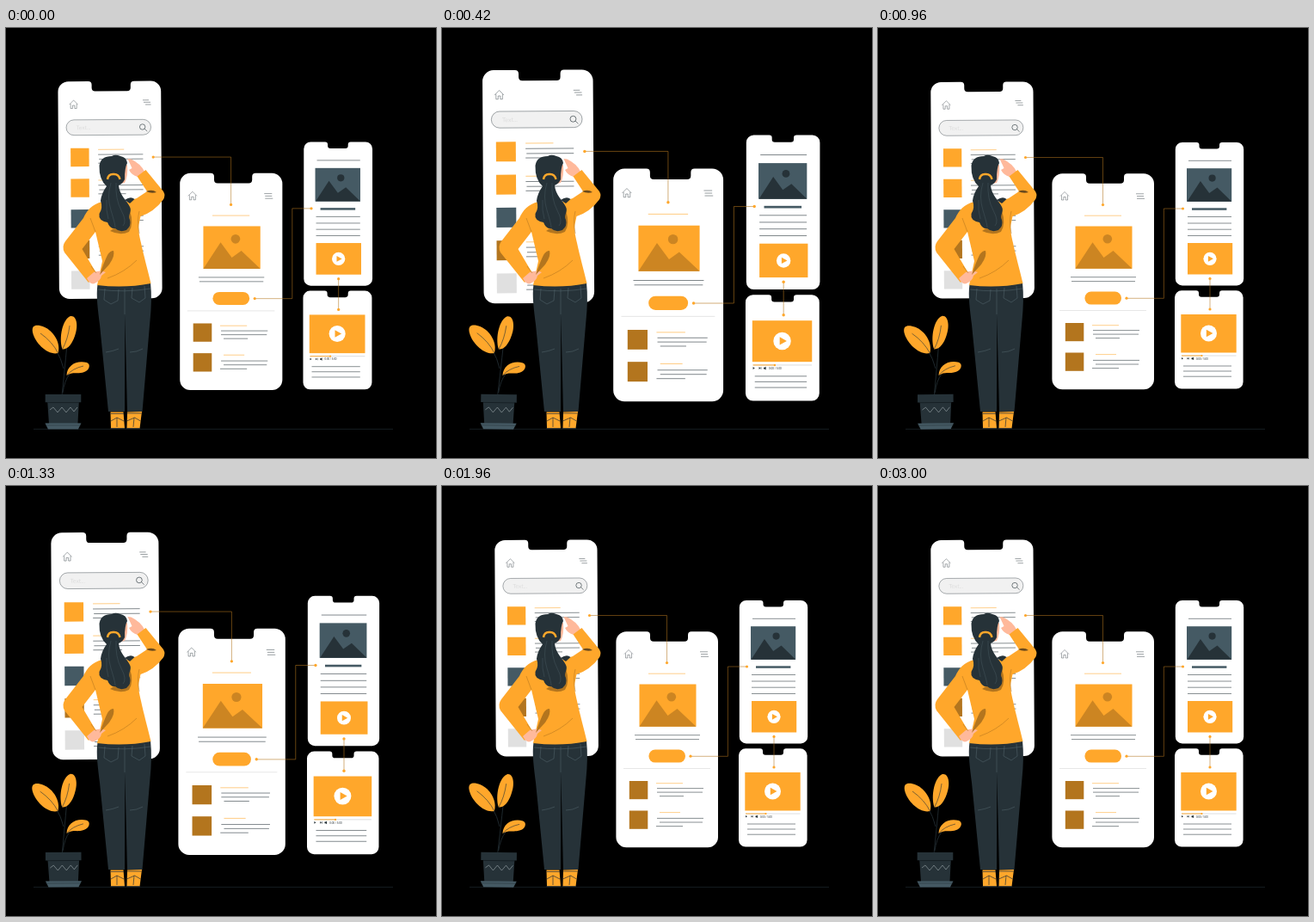
An HTML page for the animation above (3.04 s loop, 500 px wide and 500 px high).

```html
<!DOCTYPE html>
<html lang="en">
<head>
<meta charset="utf-8">
<title>Mobile wireframes</title>
<style>
html, body { margin: 0; width: 100%; height: 100%; overflow: hidden; background: #000; }
svg { display: block; width: 100vw; height: 100vh; }
text { font-family: Lato, sans-serif; }
</style>
</head>
<body>
<svg id="stage" viewBox="0 0 500 500"></svg>
<script>
const ORANGE = '#ffa72b', BROWN = '#b3751e', SHADE = '#cc8522', DARK = '#263238', SLATE = '#455a64', SKIN = '#ffb99b';

const path = (d, fill) => `<path d="${d}" fill="${fill}"/>`;
const line = (d, color = DARK, w = .55) => `<path d="${d}" fill="none" stroke="${color}" stroke-width="${w}"/>`;
const rule = (x1, x2, y, color, w) => line(`M${x1} ${y}H${x2}`, color, w);
const rules = (list, color, w) => list.map(r => rule(...r, color, w)).join('');
const rect = (x, y, w, h, fill, r = 0, more = '') =>
  `<rect x="${x}" y="${y}" width="${w}" height="${h}" rx="${r}" fill="${fill}" ${more}/>`;
const circle = (x, y, r, fill) => `<circle cx="${x}" cy="${y}" r="${r}" fill="${fill}"/>`;
const dot = (x, y) => circle(x, y, 1.6, ORANGE);

// Phone body with a notch between n1 and n2, d deep, with corners e
function phone(x, y, w, h, r, n1, n2, d, e) {
  const v = d - 2 * e, arc = (dx, dy) => `a${r} ${r} 0 0 1 ${dx} ${dy}`;
  return path(`M${x + r} ${y}H${n1}q${e} 0 ${e} ${e}v${v}q0 ${e} ${e} ${e}H${n2 - 2 * e}
    q${e} 0 ${e} ${-e}v${-v}q0 ${-e} ${e} ${-e}H${x + w - r}${arc(r, r)}V${y + h - r}
    ${arc(-r, r)}H${x + r}${arc(-r, -r)}V${y + r}${arc(r, -r)}z`, '#fff');
}

const house = (x, y) => line(`M${x - 5} ${y}l5-5 5 5M${x - 3.5} ${y - 1}v5.5h2.3v-3.5h2.4v3.5h2.3v-5.5`, DARK, .4);

const play = (x, y, r) => circle(x, y, r, '#fff') +
  path(`M${x - r * .28} ${y - r * .45}l${r * .8} ${r * .45}l${-r * .8} ${r * .45}z`, ORANGE);

function listPhone() {
  const fills = [ORANGE, ORANGE, SLATE, BROWN, '#e0e0e0'];
  const rows = fills.map((fill, i) => {
    const y = 140 + 35.5 * i;
    return rect(76.2, y, 21.3, 21.3, fill) + rule(108, 138, y + 1.7, ORANGE) +
      rules([[108, 160, y + 7.5], [109, 160, y + 12.8], [108, 140, y + 17.5]]);
  });
  return `<g transform="rotate(-.35 121.5 188.5)">` +
    phone(62, 62.7, 119.2, 251.6, 12, 97, 150, 11.5, 4) + house(80, 89.5) +
    rules([[160, 167, 84.8], [161, 169, 87.3], [163, 169.5, 90]], DARK, .45) +
    rect(71.3, 107.2, 98, 17.8, '#f1f1f1', 8.9, `stroke="${DARK}" stroke-width=".4"`) +
    `<text x="83" y="118.5" font-size="6.5" fill="#dcdcdc">Text...</text>
    <circle cx="159.5" cy="115.8" r="3.2" fill="none" stroke="${DARK}" stroke-width=".6"/>` +
    line('M162 118l3 3') + rows.join('') + '</g>';
}

function detailPhone() {
  return phone(202.4, 169.2, 118.6, 251, 12, 238, 290, 11.5, 4) + house(217, 195.5) +
    rules([[300, 309, 192.8], [301, 309, 195.6], [301, 310, 198.4]], DARK, .45) +
    rule(240, 283, 218.2, ORANGE) +
    rect(229.5, 230.5, 66, 49.2, ORANGE) + circle(266.8, 245.3, 5.3, SHADE) +
    path('M229.5 279.7L249.5 249.3L262.5 267L273.5 259L295.5 279.7z', SHADE) +
    rules([[224, 300, 289.7], [225, 299, 294.6]]) +
    rect(240.4, 306.6, 42.6, 15, ORANGE, 7.5) + rule(211, 312, 328.5, '#d4d4d4') +
    rect(217.8, 343, 21.5, 21.2, BROWN) + rect(217.8, 377.5, 21.5, 21.3, BROWN) +
    rules([[249, 280, 345.7], [253, 277, 379.6]], ORANGE) +
    rules([[250, 304, 351.6], [250, 303, 356.1], [253, 281, 360.6],
           [250, 304, 386.4], [253, 303, 391], [249, 280, 395.6]]);
}

function articlePhone() {
  return phone(345.8, 133, 79.4, 166.4, 8, 370.5, 400, 7.5, 3) +
    rule(361, 411, 154.3) + rect(359, 163.2, 52.2, 38.6, SLATE) + circle(388.6, 174.6, 4.1, DARK) +
    path('M359.5 201.8L374.9 178L385.2 192L394.5 185.5L411.2 201.8z', DARK) +
    rect(365, 209.3, 40.4, 2.5, SLATE) +
    rules([219.5, 227, 234.2, 241.5].map(y => [360, 411, y])) +
    rect(360, 250, 52.2, 36.5, ORANGE) + play(386, 268.3, 7.6);
}

function videoPhone() {
  return phone(345, 305.3, 79.6, 114.2, 8, 370, 400, 7.5, 3) +
    rect(352.3, 333, 64.4, 44.5, ORANGE) + play(384.5, 355, 9.5) +
    rule(353, 416.5, 381, '#c4c4c4') + rule(353, 377, 381, ORANGE, .9) + circle(376.5, 381, 1.1, ORANGE) +
    path('M353 383l2 1.3-2 1.300zM359.500 383l1.700 1.300-1.700 1.300zM361.500 383h.5v2.600h-.5zM364.500 383.600h1l1.500-.9v3.400l-1.500-.9h-1z', DARK) +
    `<text x="370" y="385.5" font-size="2.8" fill="${DARK}">0:00 / 5:00</text>` +
    rules([393, 399, 405.2].map(y => [355, 411, y]));
}

const links = line('M171.5 150.5H261.5V205.5M289 314.3H332.4V210H354.5M386 291.4V327', BROWN) +
  [[171.5, 150.5], [261.5, 205.6], [289, 314.2], [354.5, 210], [386, 291.4], [386, 327]].map(p => dot(...p)).join('');

const plant =
  line('M44 358Q61 372 67 396M73 345Q70 380 65 428M90 393Q70 396 66 424', DARK, .8) +
  path('M60.5 378C49 381 34 367 31 354C29 345 36 344.500 44 347.500C55 352 64 366 60.500 378z', ORANGE) +
  path('M65.5 373.5C61 360 66 338 75 335C83 334 84 348 80 358C77 367 72 374 65.500 373.500z', ORANGE) +
  path('M70.5 404C71 392 82 386 94 389C99 391 97 398 91 400C83 403 78 399 70.500 404z', ORANGE) +
  line('M40 355Q54 365 60.500 378M74 346Q72 362 65.500 373.500M90 393Q77 396 70.500 404', DARK, .6) +
  path('M45.7 426H87.3V435.3H84.8L83.5 460H50L48.3 435.3H45.7z', DARK) +
  rule(48.5, 85, 435.6, '#11191d', .7) +
  line('M51 444l4-3 5 6 5-6 5 6 5-6 4 5 4-5', '#a9b4b8') +
  path('M45.5 459.5H87.5L84 466.5H49z', SLATE) + rule(46, 87, 462, DARK, .5);

const legs =
  path('M106.5 298C104.500 312 107 328 109 345L119 446H138L138.300 334L141 446H158.500L167.500 340C169 325 169.500 310 168 296z', DARK) +
  line('M115 303l-1 13 8 5 8-4 1-13M147 302l-1 12 9 5 7-5-1-14M116 377q8-1 15-4M144 377q8 0 15-4M107 304q31 4 61-1M138 303v30', '#5d7078', .45) +
  path('M121.5 446.5h15l1.500 19H122zM141 446.500l17-.5-2.500 19.500H140.500z', ORANGE) +
  line('M121.5 448.5h15.500M141 448h16.500M122 457l7-4 8 4M129 453v11M140.500 457l9-4 7 4M149 453l-1 11M121.500 465.500h16.500M140 465.500h16', DARK, .7);

const hand = path('M94 291L102 284Q110 281 116 284L111 288Q110 294 103 297Q98 299 94 291z', SKIN);

const sweater =
  path('M141.5 152L145.500 152.500Q157 158 161 167L153 173Q146 171 143 165L146.500 163z', SKIN) +
  path(`M112 202C100 205 94 212 90 221L69 248Q64.5 254 68 261L96 296L105 285L88.5 257L104 237
    L112 271L106 299Q138 303 168.5 297C165 282 160 264 157 250C155 241 153 234 155 226L156.5 219
    Q172 214 182.5 200Q186 195 183 190L162.5 165L152.5 172.5L164 190Q158 194 152 198L140 202z`, ORANGE) +
  hand +
  path('M125 259Q127 265 120 275L109 287Q114 272 118 264Q121 259 125 259z', BROWN) +
  path('M163 190Q170 187 175 191Q169 193 163 190z', '#6b4a1c') +
  path('M144 212Q149 228 143 237Q133 242 121 236L136 226z', BROWN) +
  line('M152 270Q138 284 118 291M155 213Q152 224 155 239M104 237L98 221M105 285L99 277', BROWN);

const hair =
  path('M136 160L141 159Q142 172 138 180L133 181z', SKIN) +
  path('M138 200Q145 195 149.500 199L144 204z', DARK) +
  path(`M108.5 160Q110 149 123 149Q127 146.500 133 149Q140 150 141 157Q138 162 138 176Q136 181 131 183
    C132 194 140 200 144 208C147 214 141 217 144 223Q146 230 140 235Q132 238 127 233Q121 234 118 226
    Q107 224 108.500 216Q113 209 110 201Q111 192 117 184Q108 176 108.500 160z`, DARK) +
  line('M118 176Q119 169.500 125 170Q131 169.500 132.500 176', ORANGE, 2.4) +
  line('M122 180Q117 196 122 212T127 232M128 180Q127 199 134 212T136 230M117 200Q116 212 119 222', '#4b5c64', .45);

document.getElementById('stage').innerHTML =
  rule(32, 450, 466.4, DARK, .6) +
  `<g id="phones">${listPhone() + detailPhone() + articlePhone() + videoPhone() + links}</g>` +
  `<g id="plant">${plant}</g>` + legs + sweater + hair;

// Linear interpolation through [time, value] keys
function tween(keys, t) {
  const i = keys.findIndex(k => k[0] > t);
  if (i < 1) return keys[keys.length - 1][1];
  const [t0, a] = keys[i - 1], [t1, b] = keys[i];
  return a + (b - a) * (t - t0) / (t1 - t0);
}

const LOOP = 3040, STEP = 1000 / 24, LEAD = 14;
const beat = [[0, 1], [300, 1.1], [900, 1], [1200, 1], [1500, 1.1], [1800, 1]];
const sway = [[0, 0], [375, 1], [1125, -1], [1500, 0]];
const phones = document.getElementById('phones'), pot = document.getElementById('plant');
const start = performance.now();

function draw() {
  const t = (performance.now() - start) % LOOP;
  const u = Math.floor((t + 4) / STEP) % 73 * STEP + LEAD;  // 24 poses a second
  const s = tween(beat, u);
  phones.setAttribute('transform', `translate(243.4 241) scale(${s}) translate(-243.4 -241)`);
  pot.setAttribute('transform', `rotate(${tween(sway, u % 1500)} 63 401)`);
  requestAnimationFrame(draw);
}
draw();
</script>
</body>
</html>
```
